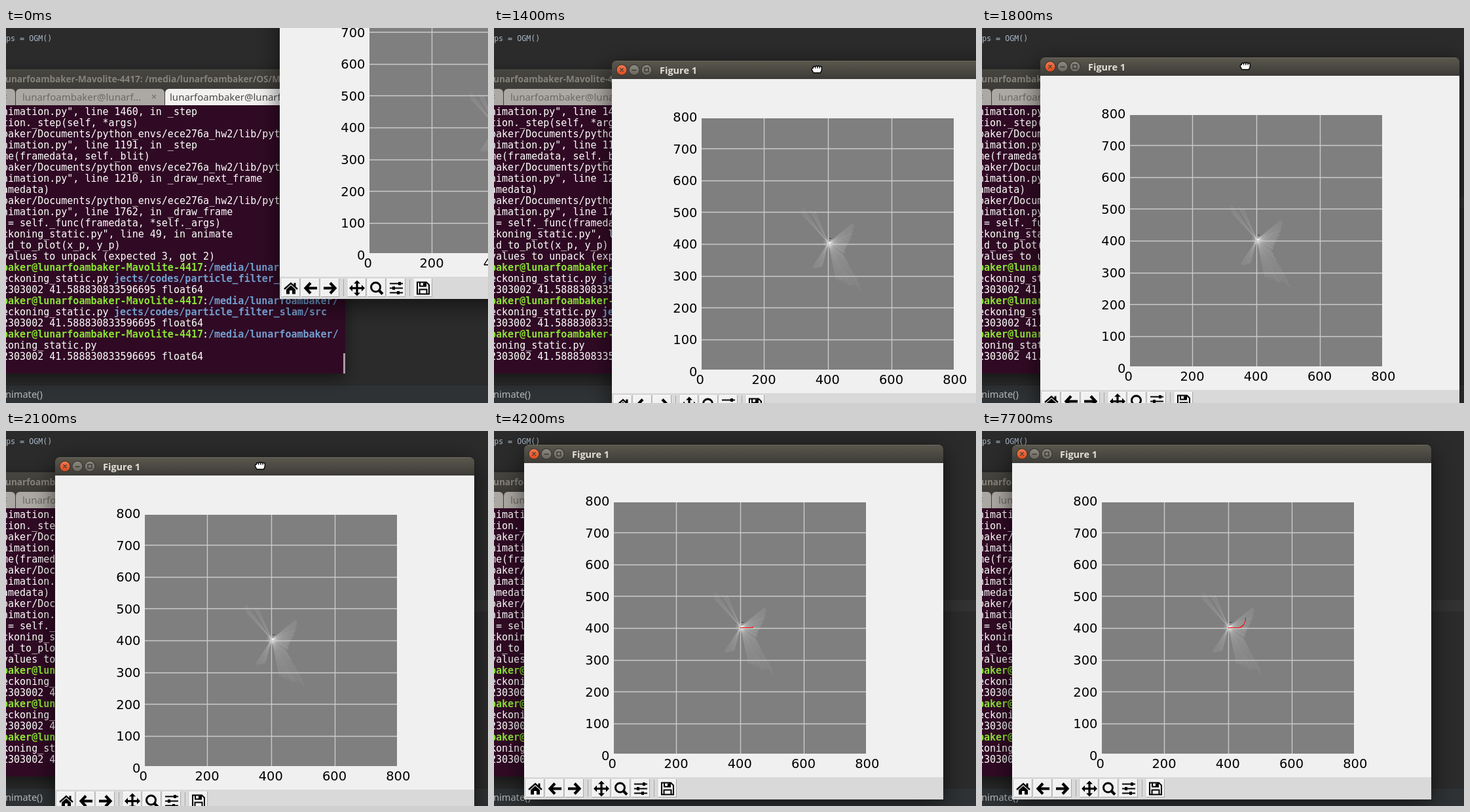
Animation of 736x573 px, one loop 8000 ms. Source, as an HTML page with a canvas:

```html
<!DOCTYPE html>
<html lang="en">
<head>
<meta charset="utf-8">
<title>Particle filter plot</title>
<style>
html, body { margin: 0; width: 100%; height: 100%; overflow: hidden; background: #2b2b2b; }
canvas { display: block; }
</style>
</head>
<body>
<canvas id="stage" width="736" height="573"></canvas>
<script>
const ctx = document.getElementById('stage').getContext('2d');
const LOOP = 8000;
const STEP = 100;
const RELEASE = 4200;
const SANS = '"Noto Sans", "Open Sans", sans-serif';
const BOLD = '"Open Sans", "Noto Sans", sans-serif';
const MONO = '"DejaVu Sans Mono", monospace';
const USER = 'lunarfoambaker';
const HOST = USER + '-Mavolite-4417';

// Window drag, key points: time, left, top
const DRAG = [
  [900, 418, -128], [1100, 286, -50], [1400, 180, 50], [1800, 89, 45],
  [1900, 89, 45], [2500, 46, 29], [RELEASE - STEP, 46, 29], [RELEASE, 46, 21]
];

// Laser fans around the robot, key points: angle in degrees, range
const FANS = [
  [[-39, 51], [-22, 39], [8, 28], [38, 29], [48, 50], [54, 90], [61, 73], [78, 56]],
  [[105, 37], [124, 48]],
  [[227, 60], [235, 66]],
  [[241, 57], [248, 54]]
];

const clamp = (v, lo, hi) => Math.min(hi, Math.max(lo, v));
const mix = (a, b, u) => a + (b - a) * u;

// Piecewise linear: every column of the key points at position p
function along(keys, p) {
  const i = clamp(keys.findIndex(k => k[0] > p), 1, keys.length - 1);
  const a = keys[i - 1], b = p >= keys.at(-1)[0] ? keys.at(-1) : keys[i];
  const u = b === keys.at(-1) && p >= b[0] ? 1 : clamp((p - a[0]) / (b[0] - a[0]), 0, 1);
  return a.slice(1).map((v, n) => mix(v, b[n + 1], u));
}

const windowAt = t => along(DRAG, t).map(Math.round);

function box(x, y, w, h, color) {
  ctx.fillStyle = color;
  ctx.fillRect(x, y, w, h);
}

function shape(x, y, w, h, radii, fill) {
  ctx.beginPath();
  ctx.roundRect(x, y, w, h, radii);
  ctx.fillStyle = fill;
  ctx.fill();
}

function disc(x, y, r, fill) {
  ctx.beginPath();
  ctx.arc(x, y, r, 0, 7);
  ctx.fillStyle = fill;
  ctx.fill();
}

function lines(color, width, ...paths) {
  ctx.strokeStyle = color;
  ctx.lineWidth = width;
  ctx.beginPath();
  for (const p of paths) p.forEach(([x, y], i) => i ? ctx.lineTo(x, y) : ctx.moveTo(x, y));
  ctx.stroke();
}

function poly(color, ...points) {
  ctx.fillStyle = color;
  ctx.beginPath();
  points.forEach(([x, y]) => ctx.lineTo(x, y));
  ctx.fill();
}

function text(str, x, y, font, color, align = 'left') {
  ctx.font = font;
  ctx.fillStyle = color;
  ctx.textAlign = align;
  ctx.fillText(str, x, y);
}

function vertical(y0, y1, top, bottom) {
  const g = ctx.createLinearGradient(0, y0, 0, y1);
  g.addColorStop(0, top);
  g.addColorStop(1, bottom);
  return g;
}

function shadowed(blur, alpha, draw) {
  ctx.save();
  ctx.shadowColor = `rgba(0,0,0,${alpha})`;
  ctx.shadowBlur = blur;
  ctx.shadowOffsetY = 8;
  draw();
  ctx.restore();
}

function at(x, y, draw) {
  ctx.save();
  ctx.translate(x, y);
  draw();
  ctx.restore();
}

function editor() {
  box(0, 0, 736, 573, '#2b2b2b');
  box(0, 258, 736, 18, '#323232');
  text('ps = OGM()', 0, 20, '11.7px ' + MONO, '#a9b7c6');
  box(0, 546, 736, 27, '#2f3234');
  box(0, 545, 736, 1, '#252627');
  text('nimate()', -1, 565, '14.6px ' + SANS, '#b4b8bb');
}

const plain = s => [[s, 'w']];
const trace = (line, fn) => plain(`nimation.py", line ${line}, in ${fn}`);
const lib = plain('baker/Documents/python_envs/ece276a_hw2/lib/python3.5');
const prompt = [[`baker@${HOST}`, 'g'], [':', 'w'], [`/media/${USER}/`, 'b']];
const run = [['eckoning_static.py ', 'w'], ['jects/codes/particle_filter_slam/src', 'b']];
const output = plain('2303002 41.588830833596695 float64');
const LOG = [
  trace(1460, '_step'), plain('tion._step(self, *args)'), lib,
  trace(1191, '_step'), plain('me(framedata, self._blit)'), lib,
  trace(1210, '_draw_next_frame'), plain('amedata)'), lib,
  trace(1762, '_draw_frame'), plain(' = self._func(framedata, *self._args)'),
  plain('ckoning_static.py", line 49, in animate'), plain('ld_to_plot(x_p, y_p)'),
  plain('values to unpack (expected 3, got 2)'),
  prompt, run, output, prompt, run, output, prompt, plain('koning_static.py'), output
];
const INK = { w: '#ffffff', g: '#8ae234', b: '#729fcf' };

function terminal() {
  shadowed(24, 0.5, () => shape(-20, 63, 538, 465, [6, 6, 0, 0], '#3c3b37'));
  shape(-20, 63, 538, 55, [6, 6, 0, 0], vertical(63, 93, '#46453f', '#3c3b37'));
  text(`${HOST.slice(1)}: /media/${USER}/OS/M`, -1, 83, `bold 13.6px ${BOLD}`, '#87837b');

  const font = `15px ${SANS}`;
  const name = `${USER}@${USER.slice(0, 6)}…`;
  const tab = (x, w, fill) => shape(x, 93, w, 25, [6, 6, 0, 0], fill);
  tab(-213, 227, '#aca8a3');
  tab(15, 227, '#aca8a3');
  tab(243, 275, '#f2f1f0');
  for (const x of [-2, 226]) text('×', x, 110, font, '#6c6862', 'center');
  text(name, 25, 111, font, '#6c6862');
  text(name, 250, 111, font, '#4a4845');

  box(0, 118, 518, 410, '#300a24');
  box(515, 497, 3, 31, '#a79ca2');
  ctx.save();
  ctx.beginPath();
  ctx.rect(0, 118, 515, 410);
  ctx.clip();
  LOG.forEach((row, i) => {
    let x = -6;
    for (const [str, ink] of row) {
      text(str, x, 133 + i * 17, `${ink === 'w' ? '' : 'bold '}15px ${MONO}`, INK[ink]);
      x += str.length * 9;
    }
  });
  ctx.restore();
}

function titleBar() {
  shape(0, 0, 640, 28, [7, 7, 0, 0], vertical(0, 28, '#5b584e', '#3c3b37'));
  box(6, 0, 628, 1, '#6b685e');
  for (let i = 0; i < 3; i++) {
    disc(15 + i * 19, 14, 8.5, '#33322e');
    disc(15 + i * 19, 14, 7.5, i ? vertical(6, 22, '#8d8a81', '#69665e') : vertical(6, 22, '#f37a50', '#dc4a1b'));
  }
  const mark = '#3a3832';
  lines(mark, 1.4, [[12.5, 11.5], [17.5, 16.5]], [[17.5, 11.5], [12.5, 16.5]], [[30.5, 14.5], [37.5, 14.5]]);
  ctx.strokeRect(50, 11, 6, 6);
  text('Figure 1', 73, 19.5, `bold 14.5px ${BOLD}`, '#e3dfd6');
}

function scanMap() {
  let seed = 7;
  const rnd = () => (seed = seed * 16807 % 2147483647) / 2147483647;
  for (const fan of FANS) {
    for (let deg = fan[0][0]; deg <= fan.at(-1)[0]; deg += 1.4) {
      const a = deg * Math.PI / 180, r = along(fan, deg)[0] * mix(0.92, 1.03, rnd());
      lines(`rgba(255,255,255,${mix(0.06, 0.14, rnd())})`, 1, [[0, 0], [r * Math.cos(a), r * Math.sin(a)]]);
    }
  }
  const glow = ctx.createRadialGradient(0, 0, 0, 0, 0, 9);
  glow.addColorStop(0, 'rgba(255,255,255,.75)');
  glow.addColorStop(0.4, 'rgba(255,255,255,.22)');
  glow.addColorStop(1, 'rgba(255,255,255,0)');
  disc(0, 0, 9, glow);
  box(1.5, -7.5, 3, 1, '#3a3a3a');
}

// Straight run, then a quarter ellipse that is slow at first and steady later
function trail(t) {
  if (t < RELEASE) return;
  const early = Math.min(0.56, 0.42 + (t - RELEASE) * 0.00047);
  const bend = Math.min(Math.PI / 2, Math.max(early, Math.PI / 2 - (7700 - t) * 0.00063));
  box(330, 279, 16, 1, '#ff0000');
  for (let a = 0; a <= bend; a += 0.02) {
    box(Math.round(345 + 11 * Math.sin(a)), Math.round(264 + 15 * Math.cos(a)), 1, 1, '#ff0000');
  }
}

function plot(t) {
  const px = v => 135.5 + v * 0.4863;
  const py = v => 475 - v * 0.4863;
  const font = '19.44px "DejaVu Sans", sans-serif';
  box(0, 28, 640, 480, '#f0f0f0');
  box(137, 88, 385, 384, '#7f7f7f');
  at(330.5, 278.5, scanMap);
  for (let v = 100; v < 800; v += 100) {
    const x = Math.floor(px(v)) + 0.5, y = Math.floor(py(v)) + 0.5;
    lines('#cbcbcb', 1.39, [[137, y], [522, y]]);
    if (v % 200 === 0) lines('#cbcbcb', 1.39, [[x, 88], [x, 472]]);
  }
  trail(t);
  for (let v = 0; v <= 800; v += 100) {
    text(v, 130.4, py(v) + 7, font, '#000', 'right');
    if (v % 200 === 0) text(v, px(v) - 0.8, 494, font, '#000', 'center');
  }
}

function arrow(dir) {
  lines('#000', 4.2, [[10 * dir, 0], [-6 * dir, 0]], [[0, -8], [-7.5 * dir, 0], [0, 8]]);
}

function home() {
  lines('#000', 2.4, [[-10, 1.5], [0, -7.5], [10, 1.5]]);
  poly('#000', [-7, 2], [0, -4.2], [7, 2], [7, 9], [2, 9], [2, 3.5], [-2, 3.5], [-2, 9], [-7, 9]);
  box(4.5, -8, 3, 6, '#000');
}

function pan() {
  for (let i = 0; i < 4; i++) {
    lines('#000', 3.2, [[0, 0], [8, 0]]);
    poly('#000', [12, 0], [7, -5], [7, 5]);
    ctx.rotate(Math.PI / 2);
  }
}

function zoom() {
  lines('#000', 4.2, [[3, 3], [9, 9]]);
  ctx.lineWidth = 3;
  ctx.beginPath();
  ctx.arc(-1.5, -1.5, 7, 0, 7);
  ctx.stroke();
}

function sliders() {
  for (let i = -1; i <= 1; i++) {
    lines('#000', 2, [[-10, i * 7], [10, i * 7]]);
    box((i ? 2 : -6) - i, i * 7 - 2.5, 4, 5, '#000');
  }
}

function save() {
  lines('#000', 2, [[-9, -9], [5, -9], [9, -5], [9, 9], [-9, 9], [-9, -10]],
    [[-5.5, 9], [-5.5, 2], [5.5, 2], [5.5, 9]], [[-5, -9], [-5, -3], [4, -3], [4, -9]]);
  box(0, -8, 3, 5, '#000');
}

const GROUPS = [[home, () => arrow(1), () => arrow(-1)], [pan, zoom, sliders], [save]];
// The arrow points away from its tail: back first, then forward

function button(x, icon) {
  box(x - 14, 511, 28, 28, '#a9a9a9');
  box(x - 14, 511, 27, 27, '#ffffff');
  box(x - 13, 512, 26, 26, '#f1f1f1');
  at(x, 525.5, icon);
}

function toolbar() {
  box(0, 508, 640, 34, '#d9d9d9');
  GROUPS.forEach((icons, g) => {
    const left = 17 + g * 101;
    if (g) box(left - 21, 512, 1, 26, '#a8a8a8');
    icons.forEach((icon, i) => button(left + i * 30, icon));
  });
}

function hand() {
  ctx.beginPath();
  ctx.moveTo(-5, 6);
  ctx.lineTo(-7.5, 1.5);
  ctx.quadraticCurveTo(-8, -2, -5.5, -1.5);
  for (let i = 0; i < 4; i++) {
    const left = -5.5 + i * 3.2;
    ctx.lineTo(left, -3);
    ctx.quadraticCurveTo(left + 1.6, i % 3 ? -6.5 : -5, left + 3.2, -3);
  }
  ctx.lineTo(7.3, 2);
  ctx.lineTo(5.5, 6);
  ctx.closePath();
  ctx.fillStyle = '#fff';
  ctx.fill();
  ctx.strokeStyle = '#000';
  ctx.lineWidth = 1.4;
  ctx.stroke();
  for (let i = 0; i < 3; i++) lines('#000', 1, [[-2.3 + i * 3.2, -3], [-2.3 + i * 3.2, -0.5]]);
}

function draw(time) {
  const t = Math.floor(time / STEP) * STEP;
  const [x, y] = windowAt(t);
  editor();
  terminal();
  at(x, y, () => {
    shadowed(36, 0.6, () => shape(0, 0, 640, 542, [7, 7, 0, 0], '#3c3b37'));
    titleBar();
    plot(t);
    toolbar();
  });
  if (t < RELEASE) {
    // The window trails behind the pointer during the fast part of the drag
    const [mx, my] = windowAt(t + clamp((1400 - t) / 3, 0, 100));
    at(mx + 313, my + 12.5, hand);
  }
}

const start = performance.now();
function tick() {
  draw((performance.now() - start) % LOOP);
  requestAnimationFrame(tick);
}
tick();
</script>
</body>
</html>
```
